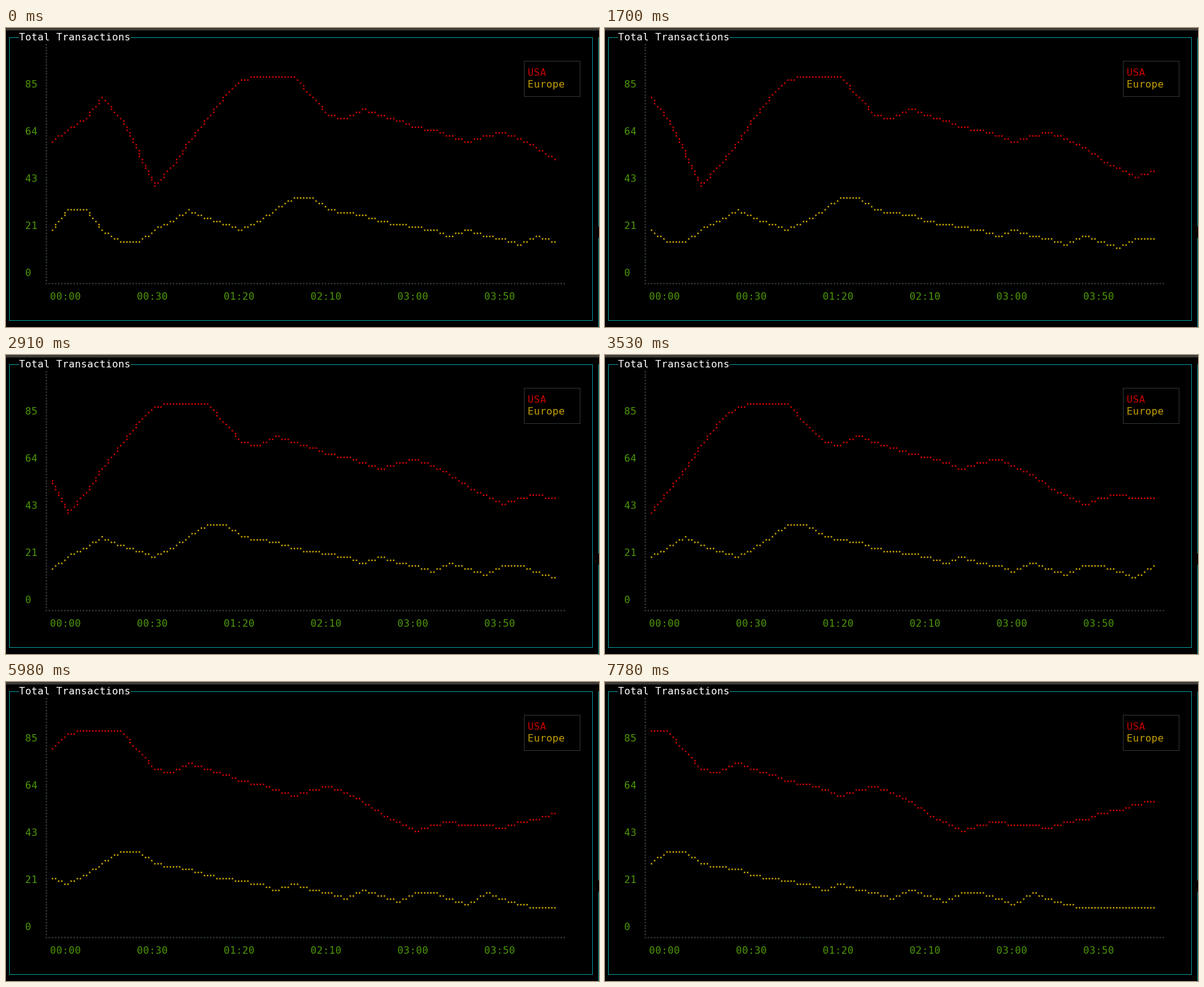
Write a matplotlib script that moves like this. It is 956x482 px and loops after 8000 ms.

```python
import matplotlib.pyplot as plt
import numpy as np
from matplotlib.animation import FuncAnimation
from matplotlib.collections import PolyCollection
from matplotlib.patches import Rectangle

W, H, DPI = 956, 482, 64
LOOP, STEP = 8000, 20
FIRST, PERIOD = 460, 610         # first update and time between updates, ms
CELL_W, CELL_H = 10, 19
LEFT, TOP = 1, 5                 # origin of the terminal grid

RED, YELLOW, GREEN = "#cc0000", "#c4a000", "#4e9a06"
CYAN, DIM = "#06989a", "#2e3436"

POINTS = 30                      # points visible at once
COLS, BASE = 168, 81             # plot size in braille dots
Y_MAX = 89 * 1.2

# turning points (sample index, value) of each series
USA = [(0, 60), (2, 70), (3, 80), (4, 70), (6, 39.6), (10.7, 88.1), (14, 89),
       (16.4, 67.9), (18, 74), (24, 60), (26.2, 64.4), (31, 44.4), (33, 48),
       (36, 46), (42, 58)]
EUROPE = [(0, 20), (1.5, 34), (3, 20), (4.5, 13), (8, 29.1), (11, 20),
          (14.5, 37.5), (16, 30), (23, 18.4), (24, 20), (27, 14), (28, 18),
          (30, 12.5), (31.5, 17.5), (34, 11), (35, 16), (37, 10.6), (42, 10)]

ANGLES = np.linspace(0, 2 * np.pi, 16, endpoint=False)
DISC = 1.4 * np.column_stack([np.cos(ANGLES), np.sin(ANGLES)])

fig = plt.figure(figsize=(W / DPI, H / DPI), dpi=DPI, facecolor="black")
ax = fig.add_axes([0, 0, 1, 1])
ax.set_xlim(0, W)
ax.set_ylim(H, 0)
ax.axis("off")


def box(x0, y0, x1, y1, color):
    ax.add_patch(Rectangle((x0, y0), x1 - x0, y1 - y0, color=color,
                           lw=0, antialiased=False))


def outline(x0, y0, x1, y1, color, title=(0, 0)):
    """One-pixel frame with room for a title in its top edge."""
    box(x0, y0, x1 + 1, y0 + 1, color)
    box(title[0], y0, title[1], y0 + 1, "black")
    box(x0, y1, x1 + 1, y1 + 1, color)
    box(x0, y0, x0 + 1, y1, color)
    box(x1, y0, x1 + 1, y1, color)


def write(col, row, text, color):
    """Put each character in its own terminal cell."""
    for i, ch in enumerate(text):
        # the nudge makes the renderer round glyph positions down
        x = LEFT + CELL_W * (col + i) - 0.49
        ax.text(x, TOP + CELL_H * row + 15, ch, color=color,
                family="DejaVu Sans Mono", size=16 * 72 / DPI,
                ha="left", va="baseline")


def dot(col, row):
    y = TOP + CELL_H + 3 + round(row * CELL_H / 4 - 0.1)
    return DISC + (65 + 5 * col, y)


def segment(x0, y0, x1, y1):
    """Bresenham line as a list of dots."""
    dx, dy = abs(x1 - x0), abs(y1 - y0)
    sx, sy = (1 if x1 >= x0 else -1), (1 if y1 >= y0 else -1)
    steep = dy >= dx
    major, minor = (dy, dx) if steep else (dx, dy)
    x, y, err, cells = x0, y0, 0, []
    for _ in range(major + 1):
        cells.append((x, y))
        err += minor
        carry = 2 * err >= major
        if carry:
            err -= major
        if steep:
            y += sy
            x += sx * carry
        else:
            x += sx
            y += sy * carry
    return cells


def curve(knots, shift):
    values = np.interp(np.arange(POINTS) + shift, *zip(*knots))
    pts = [(2 + i * COLS // POINTS, int(BASE - 2 - BASE / Y_MAX * v))
           for i, v in enumerate(values)]
    cells = set()
    for a, b in zip(pts, pts[1:]):
        cells.update(segment(*a, *b))
    return [dot(*c) for c in sorted(cells)]


def dots(verts, color):
    coll = PolyCollection(verts, facecolors=color, edgecolors="none",
                          linewidths=0)
    ax.add_collection(coll, autolim=False)
    return coll


# window edges
box(0, 0, W, 4, "#3c3b37")
box(955, 15, 956, 320, CYAN)
box(955, 338, 956, H, CYAN)

# panel, legend and labels
outline(5, 15, 945, 471, CYAN, title=(21, 201))
write(2, 0, "Total Transactions", "white")
outline(835, 53, 925, 110, DIM)
write(84, 3, "USA", RED)
write(84, 4, "Europe", YELLOW)
for k in range(5):
    write(3, 20 - 4 * k, str(round(k * Y_MAX / 5)), GREEN)
for k, label in enumerate("00:00 00:30 01:20 02:10 03:00 03:50".split()):
    write(7 + 14 * k, 22, label, GREEN)

# axes
dots([dot(0, r) for r in range(BASE)]
     + [dot(c, BASE) for c in range(COLS)], DIM)

series = [(USA, dots([], RED)), (EUROPE, dots([], YELLOW))]


def update(n):
    shift = (n * STEP + STEP // 2 - FIRST) // PERIOD + 1
    for knots, coll in series:
        coll.set_verts(curve(knots, shift))
    return [coll for _, coll in series]


anim = FuncAnimation(fig, update, frames=LOOP // STEP, interval=STEP,
                     repeat=True, repeat_delay=0, blit=False)
plt.show()
```
